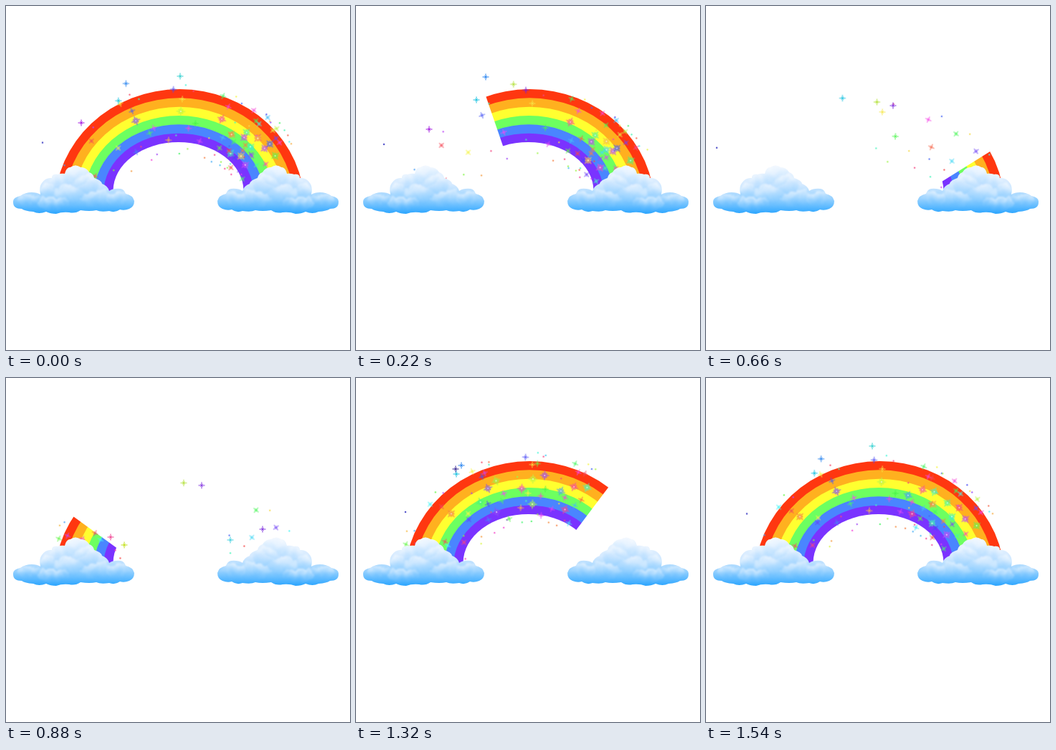
Recreate the animation shown at these times as an HTML page without scripts. Size 480 by 480 pixels, loop 1650 ms.

```html
<!DOCTYPE html>
<html lang="en">
<head>
<meta charset="utf-8">
<title>Rainbow and sparkles</title>
<style>
  html, body { margin: 0; height: 100%; overflow: hidden; background: #fff; }
  svg { display: block; }
  .stage { width: 100vw; height: 100vh; }

  .cover { animation: sweep 1650ms step-end infinite; }
  @keyframes sweep {
    0% { rotate: 0deg; }
    6.6667% { rotate: 51.8deg; animation-timing-function: steps(5); }
    40% { rotate: 148deg; }
    46.6667% { rotate: 180deg; }
    53.3333% { rotate: 216deg; animation-timing-function: steps(2); }
    66.6667% { rotate: 263.4deg; animation-timing-function: steps(3); }
    86.6667% { rotate: 328.8deg; }
    93.3333%, 100% { rotate: 360deg; }
  }

  /* --at: step of birth, --dx/--dy: drift per step, --a: angle on the arc */
  .long, .mid, .short {
    rotate: var(--a, 0deg);
    animation: fly 1650ms steps(15) infinite, var(--life) 1650ms step-end infinite;
    animation-delay: calc((var(--at) - 30) * 110ms);
  }
  .long { --life: live-long; }
  .mid { --life: live-mid; }
  .short { --life: live-short; }
  .burst .long { --dx: 0px; --dy: 3px; }
  .burst .mid { --dx: -1px; --dy: 2px; }
  .burst .short { --dx: -2px; --dy: 3px; }
  .hue { color: hsl(calc((var(--hue) + var(--n)) * 1deg) 90% 62%); }
  @keyframes fly {
    from { translate: 0px 0px; }
    to { translate: calc(15 * var(--dx)) calc(15 * var(--dy)); }
  }
  @keyframes live-long { 0% { opacity: 1; } 73.3333%, 100% { opacity: 0; } }
  @keyframes live-mid { 0% { opacity: 1; } 40%, 100% { opacity: 0; } }
  @keyframes live-short { 0% { opacity: 1; } 20%, 100% { opacity: 0; } }
</style>
</head>
<body>
<svg class="stage" viewBox="0 0 480 480">
  <defs>
    <linearGradient id="sky" x2="0" y2="1">
      <stop offset="0" stop-color="#f4f9ff"/>
      <stop offset=".4" stop-color="#d3e9ff"/>
      <stop offset=".7" stop-color="#93d0ff"/>
      <stop offset="1" stop-color="#2ba5ff"/>
    </linearGradient>
    <linearGradient id="puff" x2=".25" y2="1">
      <stop offset="0" stop-color="#fff" stop-opacity=".75"/>
      <stop offset=".4" stop-color="#e3f1ff" stop-opacity=".4"/>
      <stop offset="1" stop-color="#62baff" stop-opacity=".25"/>
    </linearGradient>
    <filter id="fluff">
      <feTurbulence type="fractalNoise" baseFrequency=".09" numOctaves="3" seed="4"/>
      <feDisplacementMap in="SourceGraphic" scale="12" xChannelSelector="R" yChannelSelector="G"/>
      <feGaussianBlur stdDeviation="1"/>
    </filter>
    <path id="outline" d="M10 274Q9 267 20 265Q27 260 36 260Q43 260 48 263Q46 252 50 247Q55 239 64 240Q64 234 72 235Q78 233 82 234Q84 225 90 225Q97 220 104 225Q112 225 116 232Q122 234 123 240Q133 243 134 248Q142 251 144 258Q150 254 160 255Q165 256 167 262Q177 264 179 272Q179 280 172 283Q165 286 159 284Q152 289 144 286Q132 288 126 285Q117 287 104 285Q97 290 88 288Q78 287 70 290Q62 290 56 287Q46 291 38 287Q26 286 22 283Q10 283 10 274Z"/>
    <clipPath id="inside"><use href="#outline"/></clipPath>
    <g id="cloud">
      <use href="#outline" fill="url(#sky)"/>
      <g clip-path="url(#inside)"><g fill="url(#puff)" filter="url(#fluff)">
        <ellipse cx="98" cy="237" rx="17" ry="14"/>
        <ellipse cx="72" cy="246" rx="14" ry="11"/>
        <ellipse cx="113" cy="249" rx="18" ry="14"/>
        <ellipse cx="59" cy="260" rx="14" ry="13"/>
        <ellipse cx="87" cy="263" rx="20" ry="14"/>
        <ellipse cx="33" cy="271" rx="18" ry="9"/>
        <ellipse cx="127" cy="268" rx="22" ry="12"/>
        <ellipse cx="158" cy="268" rx="17" ry="11"/>
        <ellipse cx="66" cy="275" rx="22" ry="9"/>
      </g></g>
    </g>

    <path id="dot" d="M-1.2 0h2.4M0-1.2v2.4" stroke="currentColor"/>
    <g id="star" stroke="currentColor" stroke-width=".9">
      <path d="M-4.5 0h9M0-4.5v9"/>
      <path d="M-2-2l4 4M-2 2l4-4" opacity=".6"/>
    </g>
    <g id="flare" stroke="currentColor">
      <circle r="4.5" fill="currentColor" stroke="none" opacity=".35"/>
      <path d="M-6.5 0h13M0-6.5v13M-3-3l6 6M-3 3l6-6" stroke-width=".9"/>
      <circle r="1" fill="#fff" stroke="none" opacity=".7"/>
    </g>

    <!-- sparkle sets around the arc, drawn at its left end -->
    <g id="few">
      <use class="hue" href="#star" x="-172" y="6" style="--n:285"/>
      <use class="hue" href="#dot" x="-184" y="-9" style="--n:210"/>
      <use class="hue" href="#star" x="-139" y="-14" style="--n:350"/>
      <use class="hue" href="#dot" x="-121" y="12" style="--n:30"/>
      <use class="hue" href="#dot" x="-103" y="-5" style="--n:320"/>
    </g>
    <g id="some">
      <use class="hue" href="#flare" x="-151" y="3" style="--n:310"/>
      <use class="hue" href="#star" x="-181" y="15" style="--n:110"/>
      <use class="hue" href="#star" x="-128" y="-9" style="--n:180"/>
      <use class="hue" href="#star" x="-110" y="18" style="--n:270"/>
      <use class="hue" href="#dot" x="-188" y="-2" style="--n:40"/>
      <use class="hue" href="#dot" x="-92" y="2" style="--n:0"/>
    </g>
    <g id="many">
      <use class="hue" href="#flare" x="-158" y="-14" style="--n:140"/>
      <use class="hue" href="#flare" x="-117" y="1" style="--n:315"/>
      <use class="hue" href="#star" x="-174" y="-3" style="--n:335"/>
      <use class="hue" href="#flare" x="-138" y="17" style="--n:190"/>
      <use class="hue" href="#star" x="-102" y="-12" style="--n:165"/>
      <use class="hue" href="#star" x="-132" y="8" style="--n:290"/>
      <use class="hue" href="#dot" x="-91" y="14" style="--n:5"/>
      <use class="hue" href="#dot" x="-154" y="24" style="--n:320"/>
      <use class="hue" href="#dot" x="-186" y="-14" style="--n:65"/>
    </g>
  </defs>

  <svg width="480" height="262">
    <ellipse cx="242.3" cy="279" rx="174" ry="163" fill="#ff3710"/>
    <ellipse cx="242" cy="275.5" rx="160.2" ry="147.2" fill="#ffb01f"/>
    <ellipse cx="241.7" cy="272" rx="146.3" ry="131.3" fill="#ffff30"/>
    <ellipse cx="241.4" cy="268.5" rx="132.5" ry="115.5" fill="#6dff60"/>
    <ellipse cx="241.1" cy="265" rx="118.7" ry="99.7" fill="#4a85ff"/>
    <ellipse cx="240.8" cy="261.5" rx="104.8" ry="83.8" fill="#7a33ff"/>
    <ellipse cx="240.5" cy="258" rx="91" ry="68" fill="#fff"/>
    <g transform="translate(241 300)">
      <rect class="cover" x="-300" width="600" height="300" fill="#fff"/>
    </g>
  </svg>

  <g transform="translate(243 290)">
    <g class="burst" style="--at:8;--a:26deg;--hue:0">
      <use class="long" href="#few"/><use class="mid" href="#some"/>
    </g>
    <g class="burst" style="--at:9;--a:46deg;--hue:70">
      <use class="long" href="#few"/><use class="mid" href="#some"/><use class="short" href="#many"/>
    </g>
    <g class="burst" style="--at:10;--a:69deg;--hue:-50">
      <use class="long" href="#few"/><use class="mid" href="#some"/><use class="short" href="#many"/>
    </g>
    <g class="burst" style="--at:11;--a:93deg;--hue:130">
      <use class="long" href="#few"/><use class="mid" href="#some"/><use class="short" href="#many"/>
    </g>
    <g class="burst" style="--at:12;--a:115deg;--hue:20">
      <use class="long" href="#few"/><use class="mid" href="#some"/><use class="short" href="#many"/>
    </g>
    <g class="burst" style="--at:13;--a:130deg;--hue:200">
      <use class="long" href="#few"/><use class="mid" href="#some"/><use class="short" href="#many"/>
    </g>
    <g class="burst" style="--at:14;--a:143deg;--hue:-30">
      <use class="long" href="#few"/><use class="mid" href="#some"/><use class="short" href="#many"/>
    </g>
    <g class="burst" style="--at:15;--a:137deg;--hue:90">
      <use class="mid" href="#some"/><use class="short" href="#many"/>
    </g>
    <g class="burst" style="--at:17;--a:147deg;--hue:0">
      <use class="short" href="#many"/>
    </g>
  </g>

  <!-- single sparkles that stray from the arc -->
  <use class="mid" href="#star" x="147" y="122" color="#17e" style="--at:12;--dx:6.8px;--dy:-4.6px"/>
  <use class="long" href="#star" x="140" y="134" color="#0bd" style="--at:12;--dx:5.6px;--dy:-.6px"/>
  <use class="long" href="#dot" x="69" y="187" color="#22b" style="--at:12;--dx:-6px;--dy:1.2px"/>
  <use class="mid" href="#star" x="105" y="163" color="#90d" style="--at:15;--dx:-1.5px;--dy:4.5px"/>
  <use class="long" href="#star" x="231" y="112" color="#72d" style="--at:16;--dx:6px;--dy:5.4px"/>
  <use class="long" href="#star" x="215" y="103" color="#ad2" style="--at:16;--dx:4.7px;--dy:6.2px"/>
  <use class="short" href="#star" x="218" y="105" color="#f72" style="--at:18;--dx:2px;--dy:5px"/>
  <use class="short" href="#star" x="232" y="95" color="#2cc" style="--at:14;--dx:11px;--dy:3px"/>
  <use class="short" href="#star" x="146" y="222" color="#e38" style="--at:8;--dx:2px;--dy:-3px"/>
  <use class="short" href="#star" x="165" y="233" color="#bd0" style="--at:8;--dx:3px;--dy:-2px"/>
  <use class="short" href="#star" x="356" y="206" color="#72d" style="--at:7;--dx:2px;--dy:5px"/>
  <use class="short" href="#star" x="312" y="222" color="#3cd" style="--at:7;--dx:1px;--dy:4px"/>
  <use class="short" href="#star" x="288" y="205" color="#629" style="--at:9;--dx:4px;--dy:11px"/>
  <use class="short" href="#star" x="135" y="135" color="#218" style="--at:10;--dx:2px;--dy:-4px"/>

  <use href="#cloud"/>
  <use href="#cloud" transform="translate(474) scale(-1 1)"/>
</svg>
</body>
</html>
```
